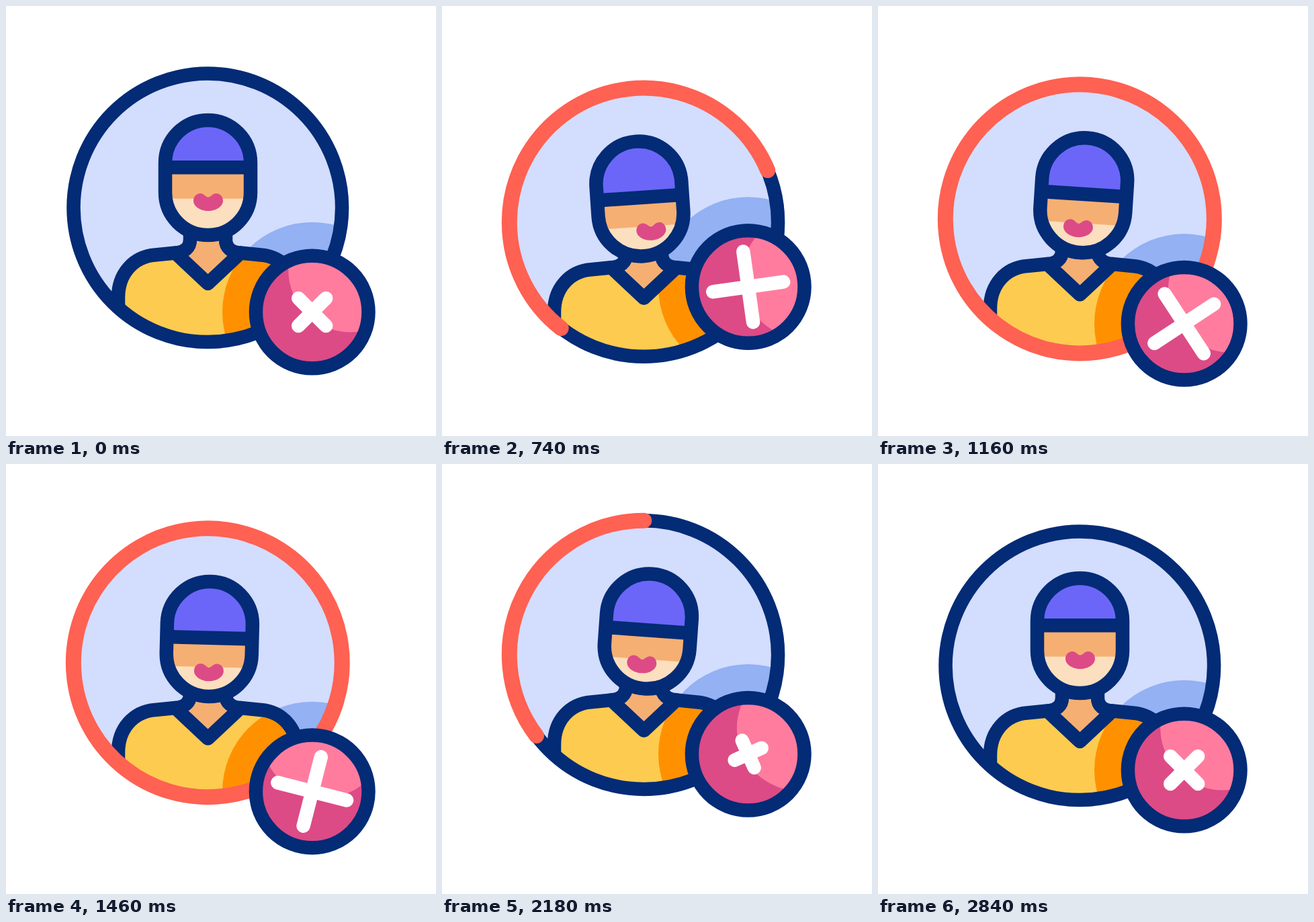
Animation of 640x640 px, one loop 3 s. Source, as an HTML page:

```html
<!DOCTYPE html>
<html lang="en">
<head>
<meta charset="utf-8">
<title>Remove user</title>
<style>
  html, body { margin: 0; height: 100%; overflow: hidden; background: #fff; }
  svg { display: block; width: 100vw; height: 100vh; }
  .line { fill: none; stroke: #032b76; stroke-width: 20.5; stroke-linecap: round; stroke-linejoin: round; }
</style>
</head>
<body>
<svg viewBox="0 0 640 640">
  <defs>
    <clipPath id="disc"><circle cx="300.3" cy="300.3" r="200"/></clipPath>
    <clipPath id="torso"><use href="#shirt"/></clipPath>
    <clipPath id="skull"><rect x="237" y="170" width="127" height="171" rx="63.5"/></clipPath>
    <clipPath id="button"><circle r="84"/></clipPath>
  </defs>

  <g id="portrait">
    <g clip-path="url(#disc)">
      <rect x="90" y="90" width="420" height="420" fill="#d3ddfd"/>
      <circle class="shade" cx="455.7" r="133.7" fill="#93b1f3"/>
      <path id="shirt" fill="#fdcb50" d="M167 520V434C167 398 190 373 222 370.5L252 367.5L300.5 413L349 367.5L379 370.5C411 373 434 398 434 434V520Z"/>
      <g clip-path="url(#torso)"><circle class="shade" cx="455.7" r="133.7" fill="#ff9100"/></g>
      <path fill="#f6af72" d="M274 335V348C274 360 265 367 252 367.5L300.5 413L349 367.5C336 367 327 360 327 348V335Z"/>
      <path class="line" d="M167 520V434C167 398 190 373 222 370.5L252 367.5L300.5 413L349 367.5L379 370.5C411 373 434 398 434 434V520"/>
      <path class="line" d="M274 335V348C274 360 265 367 252 367.5M327 335V348C327 360 336 367 349 367.5"/>
    </g>
    <circle class="line" cx="300.3" cy="300.3" r="199.8"/>
    <path id="arc" class="line" style="stroke: #ff6152; stroke-width: 23"/>
    <g id="head">
      <g clip-path="url(#skull)">
        <rect x="230" y="165" width="140" height="180" fill="#f6af72"/>
        <rect id="jaw" x="230" width="140" height="80" fill="#fcdfbe"/>
        <g id="cap">
          <rect x="230" y="140" width="140" height="90.5" fill="#6b66f8"/>
          <rect x="230" y="230" width="140" height="20.5" fill="#032b76"/>
        </g>
        <path id="lips" fill="#dc4b86" d="M289 279C295 279 297 284.500 301 284.500C305 284.500 307 279 313 279C319 279 323 284 323 290C323 298 313 305 301 305C289 305 279 298 279 290C279 284 283 279 289 279Z"/>
      </g>
      <rect class="line" x="237" y="170" width="127" height="171" rx="63.5"/>
    </g>
  </g>

  <g id="badge">
    <g id="spin">
      <g clip-path="url(#button)">
        <circle r="84" fill="#dc4b86"/>
        <circle cx="57.5" cy="-63" r="93" fill="#ff7c9f"/>
      </g>
      <path id="cross" class="line" style="stroke: #fff"/>
    </g>
    <circle class="line" r="83.8"/>
  </g>
</svg>

<script>
const LOOP = 3000;
const $ = id => document.getElementById(id);
const set = (id, name, value) => $(id).setAttribute(name, value);
const shades = document.querySelectorAll('.shade');

// Each track is a list of [time, value] keys, eased in and out between keys.
const tracks = {
  drift: [[200, 0], [900, 25], [1900, -25], [2600, 0]],
  bob:   [[200, 0], [780, -38], [1360, 38], [1940, -38], [2520, 0]],
  tilt:  [[200, 0], [640, -4.5], [1280, 4.5], [1745, -4.5], [2230, 4.3], [2820, 0]],
  nod:   [[200, 0], [700, 1], [2230, 1], [2830, 0]],
  spin:  [[200, 0], [900, 42.6], [1485, -31], [2080, 22], [2820, 0]],
  arm:   [[200, 29], [680, 53], [1660, 53], [2260, 20.5], [2840, 29]],
  grow:  [[200, 0], [1176, 360]],
  trim:  [[1704, 0], [2500, 360]],
  turn:  [[1670, 128], [2860, 488]]
};

function at(name, t) {
  const keys = tracks[name];
  const next = keys.findIndex(key => key[0] > t);
  if (next < 0) return keys[keys.length - 1][1];
  if (next === 0) return keys[0][1];
  const [t0, a] = keys[next - 1], [t1, b] = keys[next];
  const x = (t - t0) / (t1 - t0);
  return a + (b - a) * x * x * (3 - 2 * x);
}

function arcPath(from, to) {
  if (to - from < 0.1) return '';
  const point = deg => {
    const rad = deg * Math.PI / 180;
    return `${300.3 + 200 * Math.cos(rad)} ${300.3 + 200 * Math.sin(rad)}`;
  };
  const half = point((from + to) / 2);
  return `M${point(from)}A200 200 0 0 1 ${half}A200 200 0 0 1 ${point(to)}`;
}

function draw(t) {
  const drift = at('drift', t), bob = at('bob', t);
  const tilt = at('tilt', t), nod = at('nod', t);
  const arm = at('arm', t) * Math.SQRT1_2, turn = at('turn', t);

  set('portrait', 'transform', `translate(0 ${drift})`);
  shades.forEach(shade => shade.setAttribute('cy', 455.5 + bob - drift));
  set('arc', 'd', arcPath(turn + at('trim', t), turn + at('grow', t)));

  set('head', 'transform', `translate(0 ${9.5 * nod}) rotate(${tilt} 300.5 345)`);
  set('cap', 'transform', `translate(0 ${13.5 * nod})`);
  set('jaw', 'y', 286.7 + 10.5 * nod);
  set('lips', 'transform', `translate(${(3.5 - 2.5 * tilt) * nod} ${13.3 * nod})`);

  set('badge', 'transform', `translate(455.7 ${455.5 + bob})`);
  set('spin', 'transform', `rotate(${at('spin', t)})`);
  set('cross', 'd', `M${-arm} ${-arm}L${arm} ${arm}M${arm} ${-arm}L${-arm} ${arm}`);
}

const start = performance.now();
function tick() {
  draw((performance.now() - start) % LOOP);
  requestAnimationFrame(tick);
}
tick();
</script>
</body>
</html>
```
